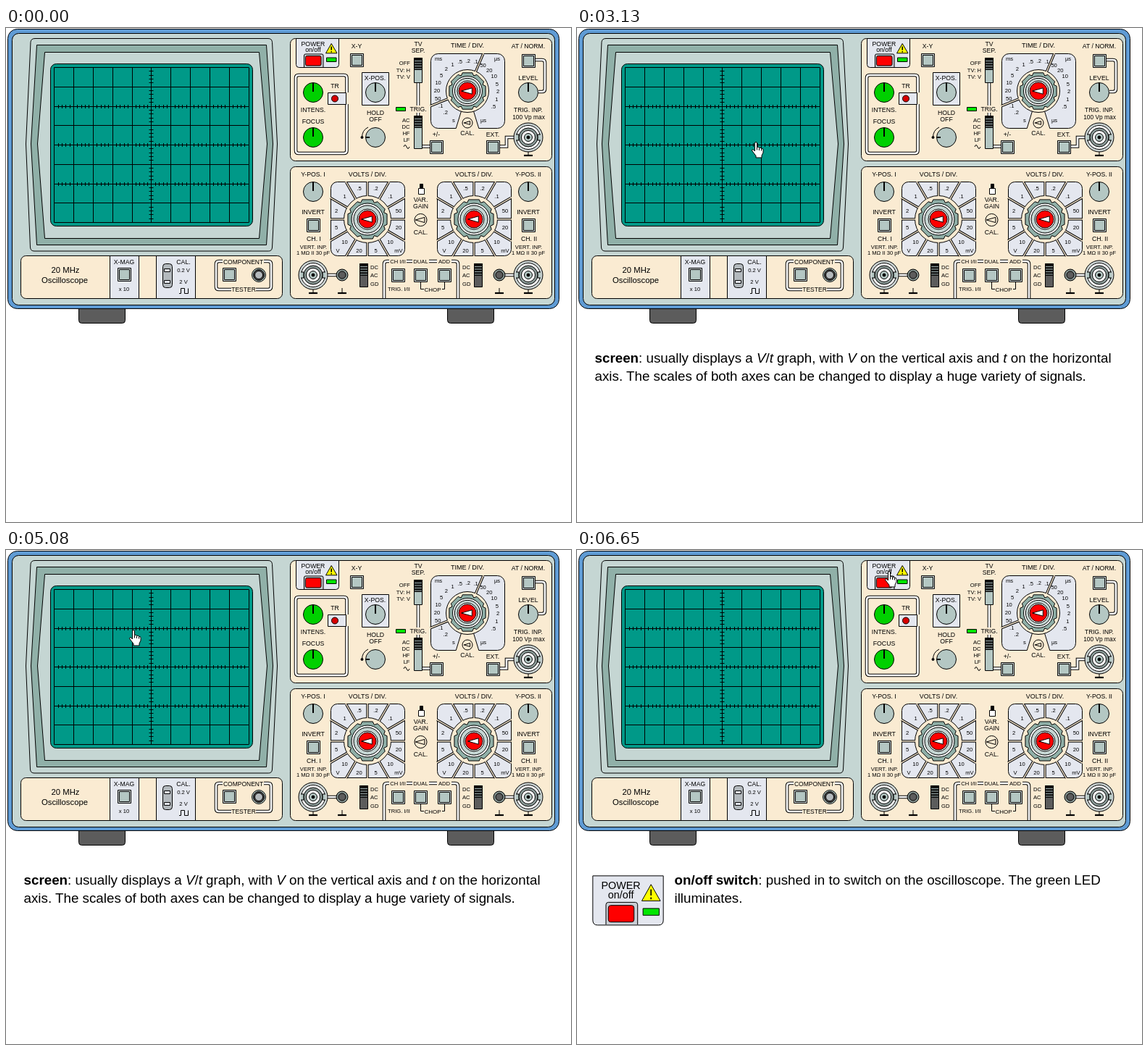
Recreate the animation shown at these times as an HTML page. Size 780 px wide and 682 px high, loop 8 s.

```html
<!DOCTYPE html>
<html lang="en">
<head>
<meta charset="utf-8">
<title>Oscilloscope</title>
<style>
html, body { margin: 0; width: 100%; height: 100%; overflow: hidden; background: #fff; }
svg { display: block; width: 780px; height: 682px; font-family: "Liberation Sans", Arial, sans-serif; }
.art { stroke: #000; fill: none; }
.art * { vector-effect: non-scaling-stroke; }
text { stroke: none; fill: #000; white-space: pre; }
.note { font-size: 18.8px; }
</style>
</head>
<body>
<svg viewBox="0 0 780 682">
  <g class="art" id="scope"></g>
  <g class="note" id="screenNote">
    <text x="24.5" y="462"><tspan font-weight="bold">screen</tspan>: usually displays a <tspan font-style="italic">V</tspan>/<tspan font-style="italic">t</tspan> graph, with <tspan font-style="italic">V</tspan> on the vertical axis and <tspan font-style="italic">t</tspan> on the horizontal</text>
    <text x="24.5" y="486.500">axis. The scales of both axes can be changed to display a huge variety of signals.</text>
  </g>
  <g id="powerNote">
    <g class="art" id="powerZoom" transform="translate(21 449) scale(1.65 1.7) translate(-400 -14)"></g>
    <g class="note">
      <text x="134.5" y="462"><tspan font-weight="bold">on/off switch</tspan>: pushed in to switch on the oscilloscope. The green LED</text>
      <text x="134.5" y="486.500">illuminates.</text>
    </g>
  </g>
  <g id="cursor" stroke="#000" fill="#fff" stroke-linejoin="round">
    <path id="arrow" d="M.5 .5V16.5L4 13L6.8 19L9 18L6.4 12.2H11.5Z"/>
    <path id="hand" transform="translate(0 -1)" d="M-1.5 13V2a1.5 1.5 0 0 1 3 0V7.5q1.5-1 3 .8q1.600-.8 3 1q2.500-.5 2.500 2.200V15l-2 4v3h-8v-2.500l-3-4l-2.700-3.500q.5-2 2.500-.8zM1.500 7.500v4M4.500 8.500v3.500M7.500 9.500v3"/>
  </g>
</svg>
<script>
const CREAM = '#faebd2', PALE = '#e4e7ef', BODY = '#c5d6d3', BEVEL = '#90b0a8',
      GREY = '#b4c7c3', GREEN = '#00e600', RED = '#ff0000', DARK = '#5c5c5c';
const $ = id => document.getElementById(id);

const rect = (x, y, w, h, fill, r = 0) =>
  `<rect x="${x + .5}" y="${y + .5}" width="${w}" height="${h}" rx="${r}" fill="${fill}"/>`;
const circle = (x, y, r, fill = 'none') => `<circle cx="${x}" cy="${y}" r="${r}" fill="${fill}"/>`;
const path = (d, fill = 'none', width = 1, stroke = '#000') =>
  `<path d="${d}" fill="${fill}" stroke="${stroke}" stroke-width="${width}"/>`;
const text = (s, x, y, size = 8.7, anchor = 'middle') =>
  `<text x="${x}" y="${y}" font-size="${size}" text-anchor="${anchor}">${s}</text>`;
const small = (s, x, y, anchor) => text(s, x, y, 7.6, anchor);
const duct = d => path(d, 'none', 4.6) + path(d, 'none', 2.6, '#fff');
const repeat = (n, f) => Array.from({length: n}, (_, i) => f(i)).join('');
const crisp = v => Math.floor(v) + .5;
const polar = (x, y, r, deg) => {
  const a = deg * Math.PI / 180;
  return [x + r * Math.sin(a), y - r * Math.cos(a)];
};

const button = (x, y) => rect(x, y, 18, 18, '#d3dbdb') + rect(x + 2, y + 2, 14, 14, GREY);
const knob = (x, y, fill = GREY, turn = 0, mark = 12) => circle(x, y, 13.5, fill) +
  `<g transform="rotate(${turn} ${x} ${y})">${path(`M${x} ${y - 13}v${mark}`, 'none', 2)}</g>`;
const pointer = (x, y, s, fill) => path(`M${x - 8 * s} ${y}L${x + 6 * s} ${y - 4 * s}V${y + 4 * s}Z`, fill);
const ground = (x, y) => path(`M${x} ${y - 7}V${y}`) + path(`M${x - 6} ${y}h12`, 'none', 2.2);
const bnc = (x, y) => ground(x, y + 25) + circle(x, y, 20, '#c9d1d0') + circle(x, y, 16.5, '#fff') +
  path(`M${x - 17} ${y - 4}h4v8h-4M${x + 17} ${y - 4}h-4v8h4`, GREY) +
  circle(x, y, 13, '#8a9996') + circle(x, y, 9.5, '#fff') + circle(x, y, 5.5, GREY) + circle(x, y, 2, '#000');
const jack = (x, y) => ground(x, y + 25) + circle(x, y, 8, '#84928f') + circle(x, y, 5, DARK);
const slider = (x, y, h, fill = GREY) => rect(x, y, 11, h, fill) + rect(x, y, 11, 16, '#111') +
  repeat(4, i => path(`M${x + 1} ${y + 4.5 + i * 3.5}h10`, 'none', 1, '#9aa'));

function radial(x, y, half, deg, from, width, stroke) {
  const [ux, uy] = polar(0, 0, 1, deg);
  const to = half / Math.max(Math.abs(ux), Math.abs(uy));
  return path(`M${x + ux * from} ${y + uy * from}L${x + ux * to} ${y + uy * to}`, 'none', width, stroke);
}

// Panel-coloured ring with outlined slits running out to the edge of the plate.
const slits = (x, y, r, angles) =>
  angles.map(a => radial(x, y, 51, a, r, 3.4)).join('') + circle(x, y, r, CREAM) +
  angles.map(a => radial(x, y, 52, a, r - 1, 1.4, CREAM)).join('');

function rotary(x, y, s = 1) {
  const lobes = Array.from({length: 8}, (_, i) =>
    [[28, -15], [28, 15], [24.5, 22.5]].map(([r, turn]) => polar(x, y, r * s, i * 45 + turn).join(' ')).join('L'));
  return path(`M${lobes.join('L')}Z`, BEVEL) + circle(x, y, 22 * s, '#f2f3f3') +
    circle(x, y, 19 * s, BODY) + circle(x, y, 14, '#fff') + circle(x, y, 12, RED) + pointer(x, y, 1.05, '#fff');
}

function voltsDial(x, y) {
  const marks = ['.2', '.1', 50, 20, 10, 5, 20, 10, 5, 2, 1, '.5'];
  return text('VOLTS / DIV.', x, 205, 8.9) + rect(x - 51, y - 52, 102, 102, PALE, 9) +
    slits(x, y, 32.5, marks.map((_, i) => i * 30)) +
    marks.map((m, i) => {
      const [tx, ty] = polar(x, y, 44.5, 15 + i * 30);
      return small(m, tx, ty + 2.7);
    }).join('') +
    small('V', x - 41, y + 46) + small('mV', x + 43, y + 46) + rotary(x, y);
}

function timeDial(x, y) {
  const marks = ['.2', '.1', 50, 20, 10, 5, 2, 1, '.5', '.2', '.1', 50, 20, 10, 5, 2, 1, '.5'];
  return text('TIME / DIV.', x, 27, 9.1) + rect(x - 51, y - 52, 102, 103, PALE, 10) +
    path(`M${x} ${y}l-16.500 54h33z`, CREAM, 1, 'none') +
    [163, 197].map(a => radial(x, y, 51.5, a, 28)).join('') + slits(x, y, 29.5, [248, 383]) +
    marks.map((m, i) => {
      const [tx, ty] = polar(x, y, 42, 226 + i * 15);
      return small(m, tx, ty + 2.7);
    }).join('') +
    small('ms', 597, 45) + small('µs', 678, 45) + small('s', 618, 130) + small('µs', 659, 130) +
    rotary(x, y, .93) + circle(x, 131, 7, CREAM) + pointer(x, 131, .6, CREAM) + text('CAL.', x, 148);
}

const powerBlock = () =>
  path('M400.500 14.500H459.500V50.500q0 4-4 4H404.500q-4 0-4-4Z', PALE) +
  text('POWER', 424, 25) + text('on/off', 424, 33) +
  path('M411.500 54V38q0-2 2-2h22.500q2 0 2 2V54', '#c9ced5') + rect(413, 38, 21.5, 13.5, RED, 2) +
  path('M449.200 21.500L457 34.800H441.500Z', '#ffff00') +
  path('M449.200 25.500v5', 'none', 1.6) + path('M449.200 32v1.500', 'none', 1.6) +
  rect(442, 40.5, 13.5, 5.5, GREEN);

function crt() {
  const colAt = i => crisp(66.65 + i * 26.85), rowAt = i => crisp(54.5 + i * 26.75);
  return path('M40 14.500H362q5 0 5.500 5L374.500 160L367.500 303q-.5 5-5 5H39q-5 0-5.500-5L27.500 160L34 19.500q.5-5 6-5Z', BODY) +
    path('M42.500 23.500H359.500L368.500 160L359.500 299.500H42.500L34.500 160Z', BEVEL) +
    path('M53.500 33.500H349.500L360.500 160L349.500 290.500H53.500L43.500 160Z', BODY) +
    rect(61, 49, 279, 224, '#009988', 8) +
    repeat(11, i => path(`M${colAt(i)} 54.500V268.500`)) +
    repeat(9, i => path(`M66.500 ${rowAt(i)}H335`)) +
    repeat(41, i => path(`M${colAt(5) - 3} ${rowAt(i / 5)}h6`)) +
    [2, 4, 6].map(row => repeat(51, i => path(`M${colAt(i / 5)} ${rowAt(row) - 2.5}v5`))).join('');
}

function lowerLeft() {
  return rect(20, 314, 361, 59, CREAM, 7) + text('20 MHz', 82, 338, 11.3) + text('Oscilloscope', 81, 352, 11.3) +
    rect(143, 314, 40, 59, PALE) + text('X-MAG', 163, 326) + button(154, 331) + small('x 10', 163, 363) +
    rect(207, 314, 54, 59, PALE) + text('CAL.', 245, 326) + rect(216, 325, 13, 33, '#b3b9bd', 4) +
    rect(218, 332, 8, 4, PALE) + rect(218, 348, 8, 4, PALE) +
    small('0.2 V', 245, 337) + small('2 V', 245, 353) + path('M239 366.500h2.500v-7h5v7h5v-7') +
    duct('M299 322H294q-4 0-4 4V357q0 4 4 4H311M356 322H362q4 0 4 4V357q0 4-4 4H345') +
    text('COMPONENT', 327.5, 326, 8.5) + text('TESTER', 328, 363.5, 8.5) + button(299, 331) +
    circle(349, 341, 9.5, GREY) + circle(349, 341, 7.5, '#444') + circle(349, 341, 5.5, '#b4b9bc');
}

function upperRight() {
  return rect(392, 14, 361, 169, CREAM, 7) + powerBlock() +
    text('X-Y', 484, 28) + button(475, 35) +
    duct('M470.500 89V69q0-4-4-4H404q-4 0-4 4V169q0 4 4 4H466.500q4 0 4-4V105') +
    rect(444, 89, 25, 16, PALE) + circle(454, 97.5, 4.5, '#d80000') + text('TR', 454, 83) +
    knob(424, 89, '#00d000') + text('INTENS.', 424, 116) + text('FOCUS', 424, 132) + knob(424, 151, '#00d000') +
    rect(491, 61, 37, 45, PALE) + text('X-POS.', 509.5, 72) + knob(510, 89) +
    text('HOLD', 510, 120) + text('OFF', 510, 129) + knob(510, 151, GREY, -90, 5) +
    path('M491.500 151Q491.500 141 500 137') + circle(491.5, 151, 1.5, '#000') +
    text('TV', 569, 25) + text('SEP.', 569, 34) + duct('M569 76V107M569 117V121') +
    slider(563, 41, 34) + slider(563, 121, 45) + duct('M575 163.500H585') +
    ['OFF', 'TV: H', 'TV: V'].map((s, i) => small(s, 558, 51 + i * 9.6, 'end')).join('') +
    ['AC', 'DC', 'HF', 'LF'].map((s, i) => small(s, 557.5, 130 + i * 9, 'end')).join('') +
    path('M549 164q2-5 4 0t4 0') + rect(538, 109, 13, 5, GREEN) + text('TRIG.', 569, 115) +
    text('+/-', 594, 150) + button(585, 155) + timeDial(637, 87) +
    text('AT / NORM.', 721, 28) + duct('M731 44H740q4 0 4 4V84q0 4-4 4H735') + button(712, 36) +
    text('LEVEL', 721, 72) + knob(721, 89) + text('TRIG. INP.', 721, 116, 8.4) + text('100 Vp max', 721.5, 126, 8.4) +
    text('EXT.', 672, 150) + duct('M682 163.500H691V151H702') + button(663, 155) + bnc(721, 151);
}

function channel(x, dialX, name, jackX) {
  return text('Y-POS. ' + name, x, 205) + knob(x, 226) + text('INVERT', x, 257) + button(x - 9, 263) +
    text('CH. ' + name, x + 1, 294) + duct(`M${x} 341H${jackX}`) + bnc(x, 341) + jack(jackX, 341) +
    voltsDial(dialX, 264) + small('VERT. INP.', x + .5, 305) + small('1 MΩ II 30 pF', x, 313);
}

function lowerRight() {
  const modes = [['CH I/II', 541], ['DUAL', 572.5], ['ADD', 605]];
  return rect(392, 191, 361, 182, CREAM, 7) + channel(424, 499, 'I', 464) + channel(721, 646, 'II', 681) +
    rect(571, 215, 4, 6, '#000') + rect(569, 221, 8, 8, '#fff') +
    text('VAR.', 572.5, 240) + text('GAIN', 572.5, 249) + circle(572.5, 265, 8.5, CREAM) +
    pointer(572.5, 265, .9, CREAM) + text('CAL.', 572.5, 285) +
    [[488, 503], [646, 630]].map(([x, tx]) => slider(x, 325, 32, DARK) +
      ['DC', 'AC', 'GD'].map((s, i) => small(s, tx, 333 + i * 11.3, 'start')).join('')).join('') +
    duct('M522 373V326q0-4 4-4H529M553 322H561M584 322H595M615 322H620q4 0 4 4V373') +
    path('M572.500 351V360.500H577M605.500 351V360.500H602') +
    modes.map(([s, x]) => small(s, x, 325) + button(Math.floor(x) - 9, 332)).join('') +
    small('TRIG. I/II', 542.5, 363) + text('CHOP', 589, 364, 8);
}

$('scope').innerHTML = [100, 609].map(x => rect(x, 380, 64, 27, DARK, 4)).join('') +
  rect(2, 1, 761, 386, '#5f9bd4', 13) + rect(8, 7, 749, 375, BODY, 9) +
  crt() + lowerLeft() + upperRight() + lowerRight();
$('powerZoom').innerHTML = powerBlock();

// Pointer track: time, x, y of the tip.
const track = [
  [1310, 39, 161], [1510, 139, 151], [2520, 139, 151], [2550, 139, 147], [2690, 152, 118], [2830, 190, 103],
  [2970, 228, 113], [3090, 247, 145], [3210, 238, 180], [3350, 205, 196], [3400, 185, 200], [3540, 140, 188],
  [3660, 119, 157], [3790, 131, 115], [3920, 168, 99], [4050, 200, 102], [4170, 219, 113], [4380, 234, 142],
  [4480, 231, 164], [4580, 205, 173], [4720, 165, 165], [4810, 151, 142], [4900, 152, 126], [4990, 158, 117],
  [5100, 180, 111], [5220, 213, 120], [5330, 228, 143], [5450, 224, 163], [5560, 212, 173], [5670, 198, 173],
  [5720, 192, 174], [5830, 192, 174], [6480, 420, 36], [6620, 428, 31], [6650, 431, 30]];

function slope(i, axis) {
  const a = track[i - 1], b = track[i], c = track[i + 1];
  const rests = (p, q) => p[1] === q[1] && p[2] === q[2];
  return !a || !c || rests(a, b) || rests(b, c) ? 0 : (c[axis] - a[axis]) / (c[0] - a[0]);
}

function tipAt(t) {
  const i = track.findIndex(p => p[0] > t) - 1;
  if (i < 0) return track.at(-1).slice(1);
  const a = track[i], b = track[i + 1], span = b[0] - a[0], u = (t - a[0]) / span, v = 1 - u;
  return [1, 2].map(k => Math.round(
    a[k] * v * v * (1 + 2 * u) + b[k] * u * u * (3 - 2 * u) +
    span * u * v * (slope(i, k) * v - slope(i + 1, k) * u)));
}

const show = (id, on) => $(id).style.display = on ? '' : 'none';
const start = performance.now();

function draw() {
  const t = (performance.now() - start) % 8000, present = t >= 1310;
  const [x, y] = present ? tipAt(t) : [0, 0];
  const onScreen = x > 61 && x < 340 && y > 49 && y < 274;
  const onPower = x > 400 && x < 460 && y > 14 && y < 54;
  show('cursor', present);
  show('arrow', !onScreen && !onPower);
  show('hand', onScreen || onPower);
  show('screenNote', onScreen);
  show('powerNote', onPower);
  $('cursor').setAttribute('transform', `translate(${x} ${y})`);
  requestAnimationFrame(draw);
}
draw();
</script>
</body>
</html>
```
